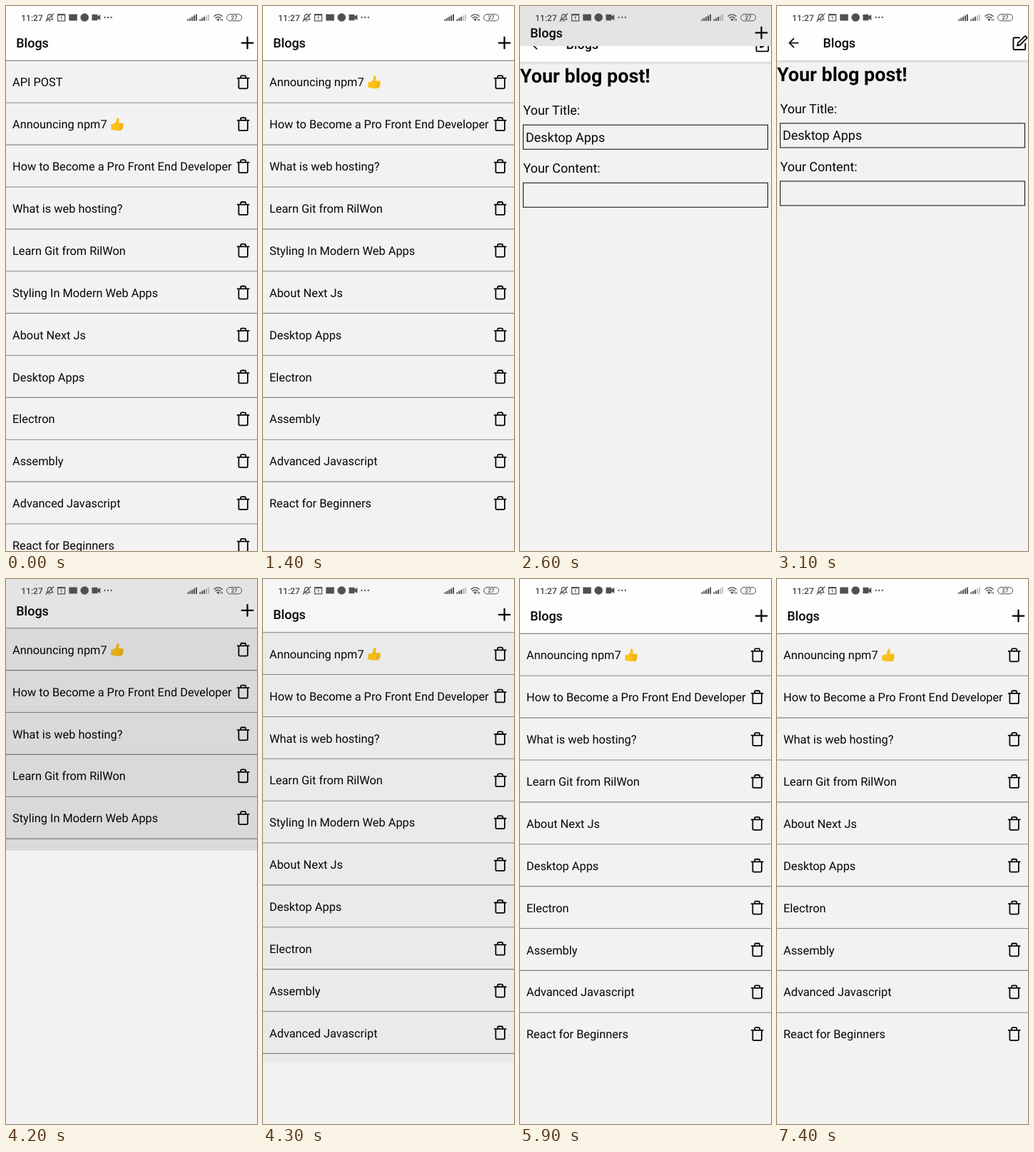
Recreate the animation shown at these times as an HTML page. Size 352x762 px, loop 8 s.

```html
<!DOCTYPE html>
<html lang="en">
<head>
<meta charset="utf-8">
<title>Blogs</title>
<style>
html, body { margin: 0; width: 100%; height: 100%; overflow: hidden; background: #f2f2f2; }
svg { display: block; width: 100vw; height: 100vh; }
text { font-family: Roboto, sans-serif; text-rendering: geometricPrecision; fill: #060606; }
.row { font-size: 16.35px; }
.field { font-size: 17.95px; }
.title { font-size: 17.95px; font-weight: 500; }
.icon { fill: none; stroke: #060606; stroke-width: 2; stroke-linecap: round; stroke-linejoin: round; }
.box { fill: none; stroke: #1c1c1c; stroke-width: 1.1; }
</style>
</head>
<body>
<svg viewBox="0 0 352 762">
  <defs>
    <g id="trash" class="icon" transform="scale(.896)">
      <path d="M3 6H21M19 6v14a2 2 0 0 1-2 2H7a2 2 0 0 1-2-2V6m3 0V4a2 2 0 0 1 2-2h4a2 2 0 0 1 2 2v2"/>
    </g>
    <g id="thumb">
      <path fill="#fcc21b" d="M.8 9.6 5 9C7.4 7.2 8.4 5 8.6 2 8.8.2 10.6 0 11.5 1.2c1.2 1.8.7 4.3-.1 6.4h5.1c2.1 0 2.3 2.4 1 3 1.3.6 1.1 2.6-.3 2.9.8.8.4 2.4-.8 2.5.4 1.2-.4 2.3-1.7 2.3H9c-3 0-5-1.2-8.2-1.2z"/>
      <path fill="none" stroke="#e39a0c" stroke-width=".8" stroke-linecap="round" d="M12.6 10.6h4.6M12.4 13.5h4.6M12.2 16h4M11.3 7.7c-.9.7-1.3 1.5-1.4 2.4"/>
    </g>
    <linearGradient id="shade" x1="0" y1="0" x2="0" y2="1">
      <stop offset="0" stop-color="#d2d2d2"/>
      <stop offset="1" stop-color="#f2f2f2"/>
    </linearGradient>
    <clipPath id="reveal"><rect id="window" width="352" height="800"/></clipPath>
  </defs>

  <g id="list">
    <rect y="-20" width="352" height="820" fill="#f2f2f2"/>
    <rect y="-20" width="352" height="96" fill="#fefefe"/>
    <text class="title" x="14.3" y="58.2">Blogs</text>
    <path class="icon" transform="translate(325.1 38.1) scale(1.12)" d="M12 5V19M5 12H19"/>
    <g id="rows"></g>
  </g>
  <rect id="dim" width="352" height="762"/>

  <g clip-path="url(#reveal)">
    <g id="detail">
      <rect y="-20" width="352" height="820" fill="#f2f2f2"/>
      <rect y="-20" width="352" height="96" fill="#fefefe"/>
      <rect y="76" width="352" height="4" fill="url(#shade)"/>
      <circle id="ripple" cx="23.3" cy="51.6"/>
      <path transform="translate(12.5 40.8) scale(.896)" fill="#111" d="M20 11H7.83l5.59-5.59L12 4l-8 8 8 8 1.41-1.41L7.83 13H20z"/>
      <text class="title" x="64.5" y="58.2">Blogs</text>
      <path class="icon" transform="translate(329.6 40.5) scale(.934)" d="M11 4H4a2 2 0 0 0-2 2v14a2 2 0 0 0 2 2h14a2 2 0 0 0 2-2v-7M18.5 2.5a2.121 2.121 0 0 1 3 3L12 15l-4 1 1-4z"/>
      <text x="0" y="105.2" font-size="26.9" font-weight="700">Your blog post!</text>
      <text class="field" x="4.5" y="149.7">Your Title:</text>
      <rect class="box" x="4.5" y="164" width="343" height="34"/>
      <text class="field" x="8" y="187.3">Desktop Apps</text>
      <text class="field" x="4.5" y="231.2">Your Content:</text>
      <rect class="box" x="4.5" y="245" width="343" height="34"/>
    </g>
  </g>

  <g id="status" fill="#505050">
    <text x="21.3" y="20.5" font-size="12" font-weight="500" style="fill:#444">11:27</text>
    <g fill="none" stroke="#505050" stroke-width="1.2" stroke-linecap="round">
      <path d="M57 18.8h8.6c-1-1-1.2-2-1.2-4 0-4.200-6-4.200-6 0 0 2-.4 3-1.400 4M60.300 21h2M56 21.300 67 10.800"/>
      <path d="M72.600 11.500h10v9.300h-10zM72.600 12.600h10"/>
      <path d="M292 14.200c3.300-3 7.700-3 11 0M294 16.600c2.200-1.800 4.800-1.800 7 0M296 18.800c1-.8 2-.8 3 0" stroke-width="1.500"/>
      <rect x="309.600" y="11.600" width="21" height="9.200" rx="4.600" stroke-width="1"/>
    </g>
    <text x="77.600" y="19.300" font-size="6.500" font-weight="700" text-anchor="middle" style="fill:#505050">1</text>
    <rect x="88.300" y="11.500" width="11.500" height="9"/>
    <circle cx="110.200" cy="16" r="5.800"/>
    <path d="M120.500 11.800h8v2.600l3.800-2.300v7.800l-3.800-2.300v2.700h-8z"/>
    <circle cx="138.600" cy="16" r="1.150"/>
    <circle cx="143.200" cy="16" r="1.150"/>
    <circle cx="147.800" cy="16" r="1.150"/>
    <circle cx="297.500" cy="20" r="1.100"/>
    <path d="M301 18h1v2.800h-1zM303 18h1v2.800h-1z"/>
    <text x="320.100" y="19.100" font-size="8" font-weight="500" text-anchor="middle" style="fill:#444">27</text>
  </g>
</svg>
<script>
const LOOP = 8000, H = 762, ROW = 58.87, TOP = 76.4;
const OPEN = 2383, CLOSE = 4115, SLIDE = 425;
const PRESS = 150;
const titles = ["API POST", "Announcing npm7", "How to Become a Pro Front End Developer",
  "What is web hosting?", "Learn Git from RilWon", "Styling In Modern Web Apps",
  "About Next Js", "Desktop Apps", "Electron", "Assembly", "Advanced Javascript", "React for Beginners"];
const pressedAt = { 0: 100, 5: 5200 };

const $ = id => document.getElementById(id);
const clamp = v => Math.min(1, Math.max(0, v));
function add(parent, tag, attrs, text) {
  const el = document.createElementNS("http://www.w3.org/2000/svg", tag);
  for (const k in attrs) el.setAttribute(k, attrs[k]);
  if (text) el.textContent = text;
  return parent.appendChild(el);
}
const shift = (el, y) => el.setAttribute("transform", `translate(0 ${y.toFixed(3)})`);

// Cubic bezier (0.35, 0.45, 0, 1), solved by bisection
function ease(x) {
  if (x <= 0 || x >= 1) return clamp(x);
  const at = (s, a, b) => 3 * (1 - s) * (1 - s) * s * a + 3 * (1 - s) * s * s * b + s ** 3;
  let lo = 0, hi = 1;
  for (let i = 0; i < 24; i++) {
    const mid = (lo + hi) / 2;
    if (at(mid, .35, 0) < x) lo = mid; else hi = mid;
  }
  return at(lo, .45, 1);
}

const rows = titles.map((title, i) => {
  const g = add($("rows"), "g");
  add(g, "path", { d: "M0 0H352", stroke: "#858585", "stroke-width": 1.1 });
  add(g, "text", { class: "row", x: 9, y: 36.1 }, title);
  if (i === 1) add(g, "use", { href: "#thumb", x: 146.5, y: 20.6 });
  const bin = add(g, "use", { href: "#trash", x: 321.9, y: 19.2 });
  return { g, bin, press: pressedAt[i] ?? Infinity };
});

for (let i = 0; i < 5; i++) {
  const h = 2.4 + i * 1.7;
  for (const x of [254.3, 271.3])
    add($("status"), "rect", { x: x + i * 2.9, y: 20.8 - h, width: 2, height: h,
      opacity: x > 260 && i > 2 ? .35 : 1 });
}

function draw(t) {
  let slot = 0;
  for (const { g, bin, press } of rows) {
    const gone = t >= press + PRESS;
    g.setAttribute("display", gone ? "none" : "inline");
    bin.setAttribute("opacity", 1 - .8 * clamp((t - press) / PRESS));
    if (!gone) shift(g, TOP + ROW * slot++);
  }

  const p = ease((t - OPEN) / SLIDE) - ease((t - CLOSE) / SLIDE);
  shift($("list"), -.02 * H * p);
  $("dim").setAttribute("opacity", .1 * clamp(p / .36));
  $("window").setAttribute("y", p > 0 ? H * (1 - p) : 800);
  shift($("detail"), .041 * H * (1 - p));

  const r = clamp((t - 3970) / 220);
  $("ripple").setAttribute("r", 18 * r);
  $("ripple").setAttribute("opacity", r > 0 ? .1 : 0);
}

const start = performance.now();
function tick() {
  draw((performance.now() - start) % LOOP);
  requestAnimationFrame(tick);
}
tick();
</script>
</body>
</html>
```
